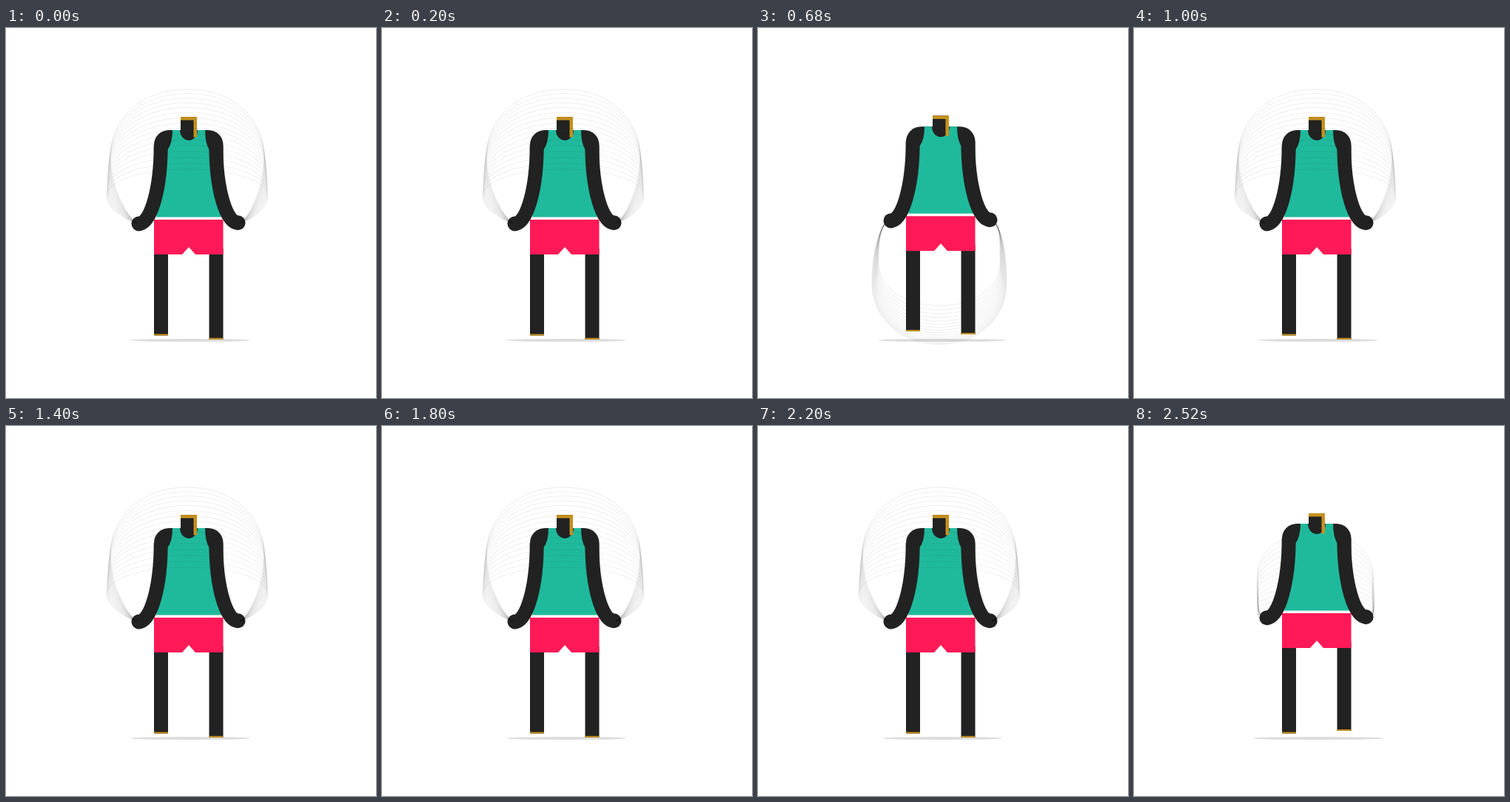
An HTML page with a canvas that plays this animation: 500x500 px, repeating every 2.6 s.

```html
<!DOCTYPE html>
<html>
<head>
<meta charset="utf-8">
<title>Skipping rope</title>
<style>
  html, body { margin: 0; width: 100%; height: 100%; overflow: hidden; background: #fff; }
  canvas { display: block; width: 500px; height: 500px; }
</style>
</head>
<body>
<canvas id="stage" width="500" height="500"></canvas>
<script>
const ctx = document.getElementById('stage').getContext('2d');
const BLACK = '#222', TEAL = '#1fba9c', PINK = '#ff1956', GOLD = '#c6921f';
const LOOP = 2600, STEP = 40, LAST_STEP = 63, CYCLE = 5;
const BLUR_SAMPLES = 16, SHUTTER = 36;
const CENTER = 246.5;

const rad = deg => deg * Math.PI / 180;

function rect(color, x, y, w, h) {
  ctx.fillStyle = color;
  ctx.fillRect(x, y, w, h);
}

function fillPath(color, draw) {
  ctx.fillStyle = color;
  ctx.beginPath();
  draw();
  ctx.fill();
}

// One swing position: an arch from hand to hand, wider when nearer the viewer.
function ropeLine(angle, handY) {
  const cx = 245;
  const top = 229 - 200 * Math.cos(angle);
  const half = 93 + 16 * Math.sin(angle);
  const mid = (top + handY) / 2;
  const lift = handY - mid;
  ctx.beginPath();
  for (const side of [-1, 1]) {
    const handX = CENTER + side * 70;
    const edge = cx + side * half;
    ctx.moveTo(handX, handY);
    ctx.bezierCurveTo(handX + side * 12, handY - lift * 0.1, edge, mid + lift * 0.5, edge, mid);
    ctx.bezierCurveTo(edge, mid - lift * 0.55, cx + side * half * 0.6, top, cx, top);
  }
  ctx.stroke();
}

// Motion blur: evenly spaced faint copies across the shutter angle.
function rope(phase, handY, inFront) {
  ctx.strokeStyle = 'rgba(34,34,34,0.055)';
  ctx.lineWidth = 1.3;
  for (let i = 0; i < BLUR_SAMPLES; i++) {
    const angle = rad(43 + phase * 72 + SHUTTER * i / (BLUR_SAMPLES - 1));
    if ((Math.sin(angle) > 0) === inFront) ropeLine(angle, handY);
  }
}

function leg(x, top, foot) {
  rect(BLACK, x, top, 19, foot - top);
  rect(GOLD, x, foot - 2, 19, 2);
}

function shirt(y) {
  fillPath(BLACK, () => ctx.roundRect(200, y, 93.5, 50, [20, 20, 0, 0]));
  fillPath(TEAL, () => {
    ctx.moveTo(225, y);
    ctx.quadraticCurveTo(225, y + 18, 218, y + 27);
    ctx.lineTo(216, y + 55);
    ctx.lineTo(203, y + 117.5);
    ctx.lineTo(291, y + 117.5);
    ctx.lineTo(277, y + 55);
    ctx.lineTo(275, y + 27);
    ctx.quadraticCurveTo(269, y + 18, 269, y);
  });
}

function shorts(y) {
  fillPath(PINK, () => {
    ctx.moveTo(200, y);
    ctx.lineTo(293.5, y);
    ctx.lineTo(293.5, y + 47);
    ctx.lineTo(256, y + 47);
    ctx.lineTo(247, y + 37);
    ctx.lineTo(238, y + 47);
    ctx.lineTo(200, y + 47);
  });
}

function arm(side, bodyY, handY) {
  const shoulder = CENTER + side * 37.3;
  ctx.strokeStyle = BLACK;
  ctx.lineWidth = 19;
  ctx.beginPath();
  ctx.moveTo(shoulder, bodyY + 20);
  ctx.bezierCurveTo(shoulder, bodyY + 80, CENTER + side * 51, handY, CENTER + side * 67, handY);
  ctx.stroke();
  fillPath(BLACK, () => ctx.arc(CENTER + side * 67, handY, 10, 0, Math.PI * 2));
}

function neck(bodyY, y) {
  fillPath(BLACK, () => ctx.ellipse(CENTER + 0.5, bodyY, 12, 14, 0, 0, Math.PI));
  rect(BLACK, 236, y, 22, bodyY - y + 1);
  rect(GOLD, 236, y, 22, 4.5);
  rect(GOLD, 253.5, y, 4.5, 27.5);
}

function draw(phase) {
  const wave = shift => Math.cos(rad(72 * (phase - shift)));
  const bob = wave(0.3);
  const bodyY = 135 + 3.1 * bob;
  const handY = 261.2 + 2.8 * bob;

  rect('#fff', 0, 0, 500, 500);
  fillPath('#dcdcdc', () => ctx.ellipse(249, 422, 84.7 - 3.9 * bob, 2, 0, 0, Math.PI * 2));
  rope(phase, handY, false);

  leg(200, bodyY + 160, 414 + 5 * wave(4));
  leg(274.5, bodyY + 160, 416.5 + 4.7 * bob);
  shirt(bodyY);
  neck(bodyY, 119 + 1.1 * bob);
  shorts(bodyY + 121);
  arm(-1, bodyY, handY + 0.7);
  arm(1, bodyY, handY - 0.5);

  rope(phase, handY, true);
}

function tick() {
  const step = Math.min(LAST_STEP, Math.floor(performance.now() % LOOP / STEP));
  draw(step % CYCLE);
  requestAnimationFrame(tick);
}
tick();
</script>
</body>
</html>
```
